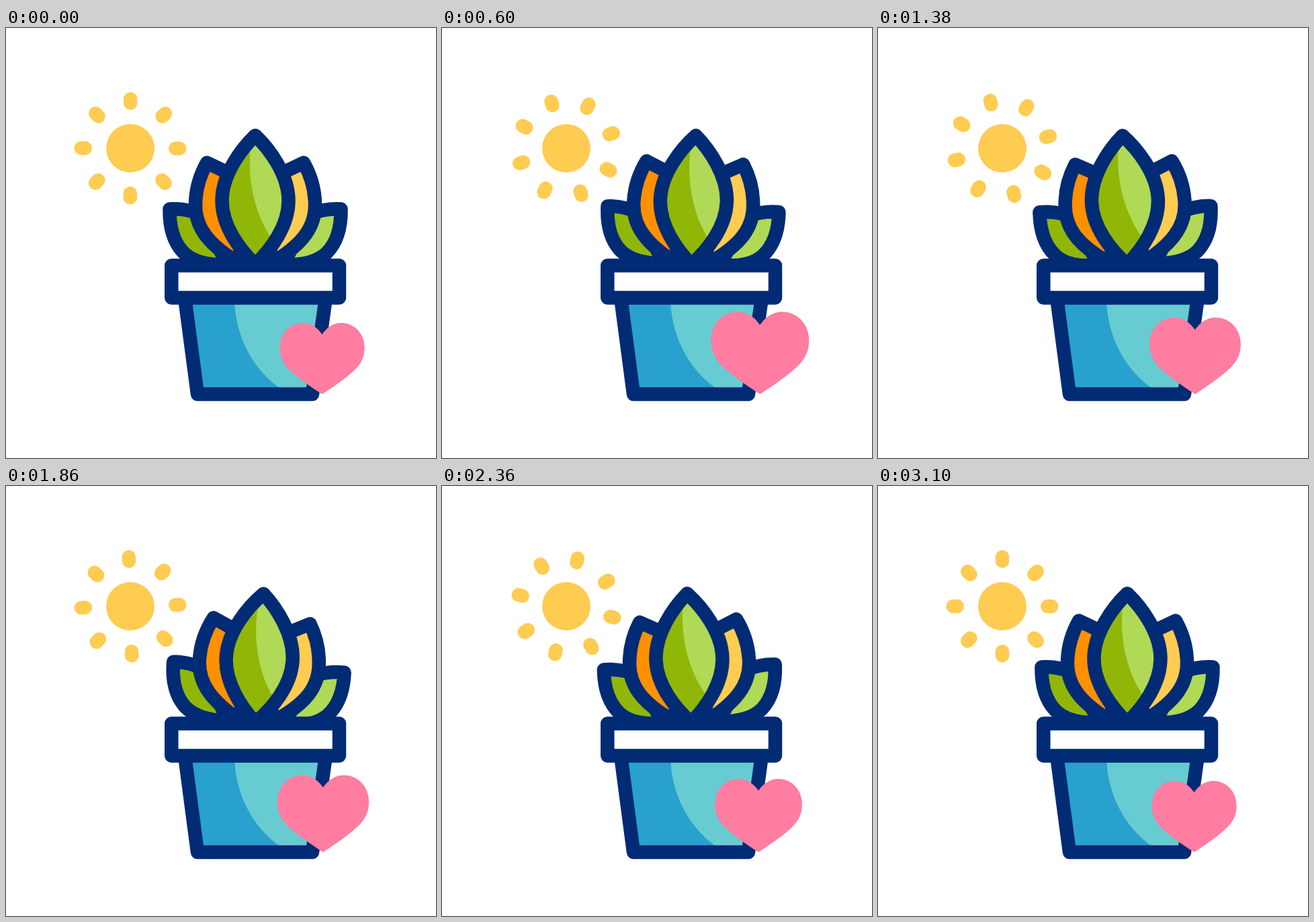
Write an HTML page that moves like this. It is 640x640 px and loops after 3.22 s.

```html
<!DOCTYPE html>
<html lang="en">
<head>
<meta charset="utf-8">
<title>Potted plant</title>
<style>
  html, body { margin: 0; width: 100%; height: 100%; overflow: hidden; background: #fff; }
  svg { display: block; width: 100vw; height: 100vh; }
  .line { stroke: #022b75; stroke-width: 20.5; stroke-linejoin: round; }
</style>
</head>
<body>
<svg viewBox="0 0 640 640">
  <defs>
    <path id="outer" d="M290 277Q265 268 243.500 269.500C243 300 252 322 265 335C280 349 300 352 330 353Z"/>
    <path id="inner" d="M340 220L299 200.500C288 220 282 240 282 264C282 300 305 325 350 352Z"/>
    <path id="middle" d="M371 160C350 180 321.500 218 321.500 257C321.500 295 348 330 371 352C394 330 420.500 295 420.500 257C420.500 218 392 180 371 160Z"/>
    <path id="body" d="M266 401L285 545H456L476 401Z"/>
    <clipPath id="inMiddle"><use href="#middle"/></clipPath>
    <clipPath id="inBody"><use href="#body"/></clipPath>
  </defs>

  <circle cx="185" cy="179" r="36" fill="#ffcc52"/>
  <g id="rays" stroke="#ffcc52" stroke-width="20.500" stroke-linecap="round"></g>

  <g id="plant">
    <g class="line">
      <use href="#outer" fill="#90b707"/>
      <use href="#outer" fill="#b0d955" transform="translate(742) scale(-1 1)"/>
      <use href="#inner" fill="#ff9000"/>
      <use href="#inner" fill="#ffcc52" transform="translate(742) scale(-1 1)"/>
    </g>
    <use href="#middle" fill="#90b707"/>
    <path clip-path="url(#inMiddle)" fill="#b0d955" d="M366 165C357 215 367 275 398 317L430 300V150H366Z"/>
    <use href="#middle" class="line" fill="none"/>
  </g>

  <use href="#body" fill="#28a1cf"/>
  <path clip-path="url(#inBody)" fill="#67ccd1" d="M340 400C340 455 365 505 406 535L420 550H480V400Z"/>
  <use href="#body" class="line" fill="none"/>
  <rect class="line" x="246.300" y="353.500" width="249.700" height="48" fill="#fff"/>

  <path id="heart" fill="#ff7da0" d="M470.500 456C464 446 454 439 442 439C423 439 407.500 454 407.500 476C407.500 490 413 500 421 508C432 519 452 533 470.500 545C489 533 509 519 520 508C528 500 533.700 490 533.700 476C533.700 454 518 439 499 439C487 439 477 446 470.500 456Z"/>
</svg>
<script>
  const LOOP = 3220, REST = 3100;
  const [rays, plant, heart] = ['rays', 'plant', 'heart'].map(id => document.getElementById(id));

  for (let a = 0; a < 360; a += 45)
    rays.innerHTML += `<path d="M185 105.800V111.800" transform="rotate(${a} 185 179)"/>`;

  // One sway: [ms, degrees]
  const SWAY = [[0, 0], [200, 2.65], [375, 3.6], [600, 2], [735, 0], [860, -1.8],
                [1060, -3.1], [1180, -3.2], [1380, -2.1], [1500, 0]];
  const last = SWAY.length - 1;

  function slope(i) {
    if (i === 0 || i === last) return 0.0155;
    const [a, b] = [SWAY[i - 1], SWAY[i + 1]];
    return (b[1] - a[1]) / (b[0] - a[0]);
  }

  // Smooth Hermite curve through the sway points
  function sway(t) {
    t %= 1500;
    const i = SWAY.findIndex((p, k) => k < last && t < SWAY[k + 1][0]);
    const [t0, v0] = SWAY[i], [t1, v1] = SWAY[i + 1];
    const d = t1 - t0, u = (t - t0) / d, w = 1 - u;
    return v0 * w * w * (1 + 2 * u) + v1 * u * u * (3 - 2 * u)
      + d * u * w * (slope(i) * w - slope(i + 1) * u);
  }

  // Eased swell around the centre of each beat
  function beat(t) {
    const u = Math.max(0, 1 - Math.abs(t % 1080 - 545) / 468);
    return 1 + 0.163 * u * u * (3 - 2 * u);
  }

  function draw(now) {
    let t = now % LOOP;
    if (t >= REST) t = 0;
    rays.setAttribute('transform', `rotate(${t * 0.12} 185 179)`);
    plant.setAttribute('transform', `rotate(${sway(t)} 371 355)`);
    heart.setAttribute('transform', `translate(453 545) scale(${beat(t)}) translate(-453 -545)`);
  }

  const start = performance.now();
  function tick() {
    draw(performance.now() - start);
    requestAnimationFrame(tick);
  }
  tick();
</script>
</body>
</html>
```
